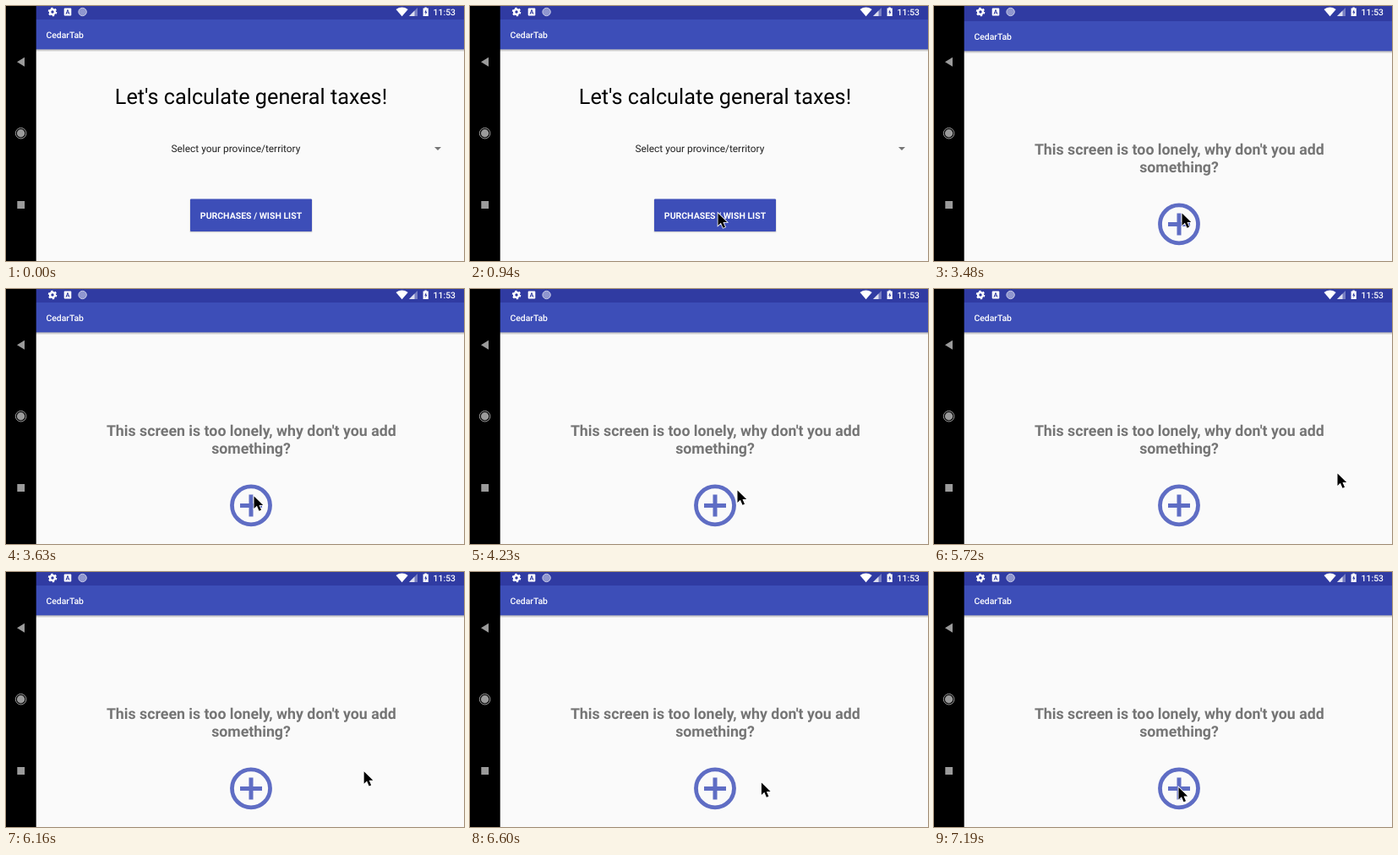
An HTML page that plays this animation: 542 by 302 pixels, repeating every 8 s.

```html
<!DOCTYPE html>
<html lang="en">
<head>
<meta charset="utf-8">
<title>Tax app</title>
<style>
  html, body { margin: 0; width: 100%; height: 100%; overflow: hidden; }
  svg { display: block; width: 100%; height: 100%; }
  text { font-family: Roboto, sans-serif; text-rendering: geometricPrecision; }
  .middle { text-anchor: middle; }
  .label { font-size: 10.4px; font-weight: 500; fill: #fff; }
  .button { font-size: 10.5px; font-weight: 700; fill: #fff; }
  .question { font-size: 17.75px; font-weight: 700; fill: #757575; }
</style>
</head>
<body>
<svg viewBox="0 0 542 302">
  <defs>
    <linearGradient id="shade" x2="0" y2="1">
      <stop stop-color="#000" stop-opacity=".3"/>
      <stop offset="1" stop-color="#000" stop-opacity="0"/>
    </linearGradient>
  </defs>
  <rect width="542" height="302" fill="#fafafa"/>

  <g id="app">
    <rect x="35" y="51" width="507" height="3.5" fill="url(#shade)"/>
    <rect x="35" y="-2" width="507" height="18" fill="#303ba2"/>
    <rect x="35" y="16" width="507" height="35.3" fill="#3d4eb8"/>
    <text class="label" x="47.5" y="37.8">CedarTab</text>

    <g id="home">
      <text class="middle" x="290" y="115.5" font-size="25.25">Let's calculate general taxes!</text>
      <text x="195.5" y="173" font-size="11.9" fill="#212121">Select your province/territory</text>
      <path d="M507 167h8l-4 4z" fill="#757575"/>
      <rect x="217.5" y="229" width="145" height="39.3" rx="1" fill="#000" opacity=".16"/>
      <rect x="218" y="228.5" width="144" height="38.5" rx="1" fill="#3d4eb8"/>
      <text class="button middle" x="290" y="251.7">PURCHASES / WISH LIST</text>
    </g>

    <g id="empty">
      <text class="question middle" x="290.3" y="174">This screen is too lonely, why don't you add</text>
      <text class="question middle" x="290" y="194.7">something?</text>
      <g fill="none" stroke="#5f6dc4">
        <circle cx="290" cy="256.4" r="22.5" stroke-width="4.8"/>
        <path d="M277 256.4h26M290 243.4v26" stroke-width="5"/>
      </g>
    </g>
  </g>

  <!-- status bar -->
  <g fill="#fff">
    <circle cx="55" cy="7" r="2.9" fill="none" stroke="#fff" stroke-width="2.4"/>
    <circle cx="55" cy="7" r="4.5" fill="none" stroke="#fff" stroke-width="1.6" stroke-dasharray="2.36"/>
    <rect x="68.7" y="2.5" width="8.6" height="9" rx="1"/>
    <path d="M71 9.7l2-5.2 2 5.2M71.7 8h2.6" fill="none" stroke="#303ba2"/>
    <circle cx="90.6" cy="7" r="4.7" fill="#8f96cf" stroke="#c3c7e6"/>
    <path d="M468.6 12.2L461.5 4Q468.6-.8 475.7 4z"/>
    <path d="M487 2v10h-10z" opacity=".35"/>
    <path d="M483.5 5.5v6.5h-6.500z" opacity=".75"/>
    <path d="M495.400 1.500h2.400v1h2v9.500h-6.200v-9.500h1.800z"/>
    <path d="M497.200 4l-2 3.700h1.300v2.800l2-3.700h-1.300z" fill="#303ba2"/>
    <text class="label" x="505.600" y="10.800">11:53</text>
  </g>

  <!-- navigation bar -->
  <rect width="35.700" height="302"/>
  <g fill="#9b9b9b">
    <path d="M13 66.200l9-5.500v11z"/>
    <circle cx="17.600" cy="150.700" r="4.700"/>
    <circle cx="17.600" cy="150.700" r="6.300" fill="none" stroke="#9b9b9b"/>
    <rect x="13.300" y="231" width="8.800" height="9"/>
  </g>

  <path id="pointer" d="M0 0V14.500L3.400 11.300 6 17.300 8.500 16.200 6 10.500H10.700Z"
        stroke="#fff" stroke-width="1.600" paint-order="stroke"/>
</svg>

<script>
const LOOP = 8000;
const OPEN = 3480;
const SETTLED = 3630;

// Each move runs in discrete steps; ease holds the exponents for x and y.
const moves = [
  { start: 500, end: 940, steps: 4, from: [320, 271], to: [293.5, 245.5], ease: [0.8, 0.8] },
  { start: 4230, end: 5270, steps: 8, from: [316.5, 238.5], to: [476.5, 218.5], ease: [1, 1] },
  { start: 5720, end: 6750, steps: 8, from: [477.5, 218.5], to: [315.5, 253.5], ease: [1.3, 0.8] },
  { start: 6890, end: 7190, steps: 3, from: [304, 254], to: [289.5, 255], ease: [0.8, 0.8] }
];

const [app, home, empty, pointer] =
  ["app", "home", "empty", "pointer"].map(id => document.getElementById(id));

const show = (node, visible) => node.setAttribute("visibility", visible ? "visible" : "hidden");
const moveTo = (node, x, y) => node.setAttribute("transform", `translate(${x} ${y})`);

function pointerAt(time) {
  const move = moves.findLast(m => time >= m.start);
  if (!move) return null;
  const last = move.steps - 1;
  const step = Math.floor((time - move.start) / (move.end - move.start) * last + 0.04);
  const progress = Math.min(step, last) / last;
  return move.from.map((a, i) => a + (move.to[i] - a) * progress ** move.ease[i]);
}

function draw(now) {
  const time = now % LOOP;
  const opened = time >= OPEN;
  show(home, !opened);
  show(empty, opened);
  moveTo(app, 0, opened && time < SETTLED ? 2 : 0);

  const position = pointerAt(time);
  show(pointer, position);
  if (position) moveTo(pointer, ...position);
}

const origin = performance.now();
function tick() {
  draw(performance.now() - origin);
  requestAnimationFrame(tick);
}
tick();
</script>
</body>
</html>
```
